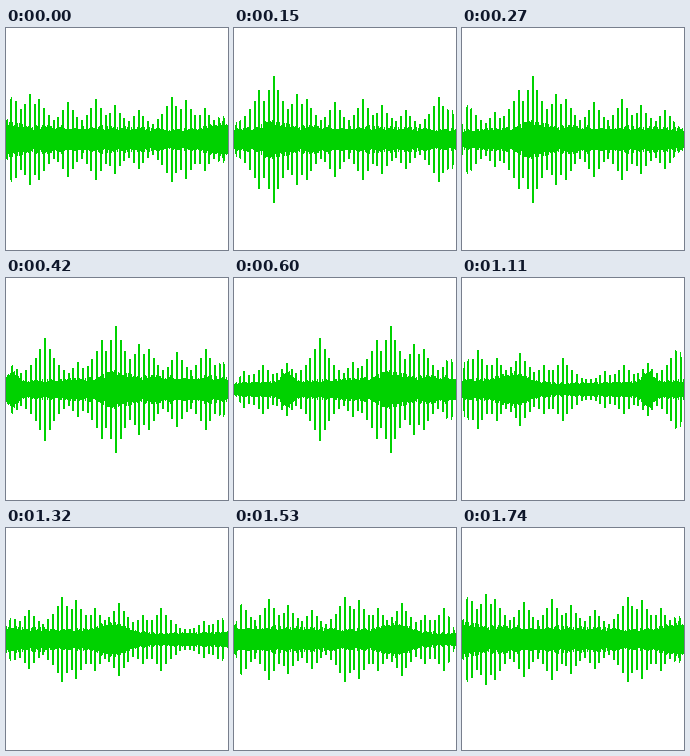
These frames come from a looping animation (222x222 px, 1.77 s). An HTML page:

```html
<!DOCTYPE html>
<html lang="en">
<head>
<meta charset="utf-8">
<title>Scrolling waveform</title>
<style>
  html, body { margin: 0; width: 100%; height: 100%; overflow: hidden; background: #fff; }
  svg { display: block; width: 100vw; height: 100vh; }
</style>
</head>
<body>
<svg viewBox="0 0 222 222" shape-rendering="crispEdges"><path id="wave" fill="#00d200"/></svg>
<script>
const SIZE = 222, MID = 111.5, EDGE = 11;
const PERIOD = 453.2, SPIKES = 96, GAP = PERIOD / SPIKES, FIRST = 0.45;
const STEP = 30, STEPS = 59;

// Crests of the spike envelope: [spike index, half height].
const crests = [
  [0, 63], [5, 45], [7, 40], [13, 37], [19, 40], [23, 34], [28, 29],
  [35, 42], [38, 39], [42, 31], [47, 36], [52, 24], [56, 31], [65, 18],
  [69, 24], [74, 26], [81, 51], [88, 27], [93, 49]
];

// Thick places of the solid core: [spike index, extra half height, spread].
const swells = [[0, 6, 2.5], [45.5, 8, 4], [74, 11, 1.3]];

const mod = (a, n) => ((a % n) + n) % n;
const noise = i => mod(Math.sin(i * 12.9898) * 43758.5453, 1);

function distance(a, b) {
  const d = mod(a - b, SPIKES);
  return Math.min(d, SPIKES - d);
}

const spikeHeight = k =>
  Math.max(10, ...crests.map(([at, h]) => h * Math.exp(-distance(k, at) / 4)));

function coreHeight(k) {
  const base = 9 - 3 * Math.cos((k - 60) / SPIKES * 2 * Math.PI);
  return swells.reduce((sum, [at, h, spread]) =>
    sum + h * Math.exp(-((distance(k, at) / spread) ** 2)), base);
}

// Spikes shrink along a rounded curve towards both sides of the stage.
function taper(x) {
  const d = Math.min(x, SIZE - x, EDGE) / EDGE;
  return Math.sqrt(1 - (1 - d) ** 2);
}

function heightAt(x, shift) {
  const u = mod(x - shift, PERIOD);
  const k = (u - FIRST) / GAP;
  const nearest = Math.round(k);
  const body = coreHeight(k) * (0.8 + 0.4 * noise(Math.floor(u)));
  const onSpike = Math.abs(k - nearest) * GAP < 1;
  return onSpike ? Math.max(body, spikeHeight(nearest) * taper(x)) : body;
}

const wave = document.getElementById("wave");

function draw(step) {
  const shift = PERIOD * step / (STEPS - 1);
  let d = "";
  for (let x = 0; x < SIZE; x++) {
    const h = Math.round(heightAt(x + 0.5, shift)) + 0.5;
    d += `M${x} ${MID - h}h1v${2 * h}h-1z`;
  }
  wave.setAttribute("d", d);
}

const start = performance.now();
function tick() {
  draw(Math.floor((performance.now() - start) / STEP) % STEPS);
  requestAnimationFrame(tick);
}
tick();
</script>
</body>
</html>
```
